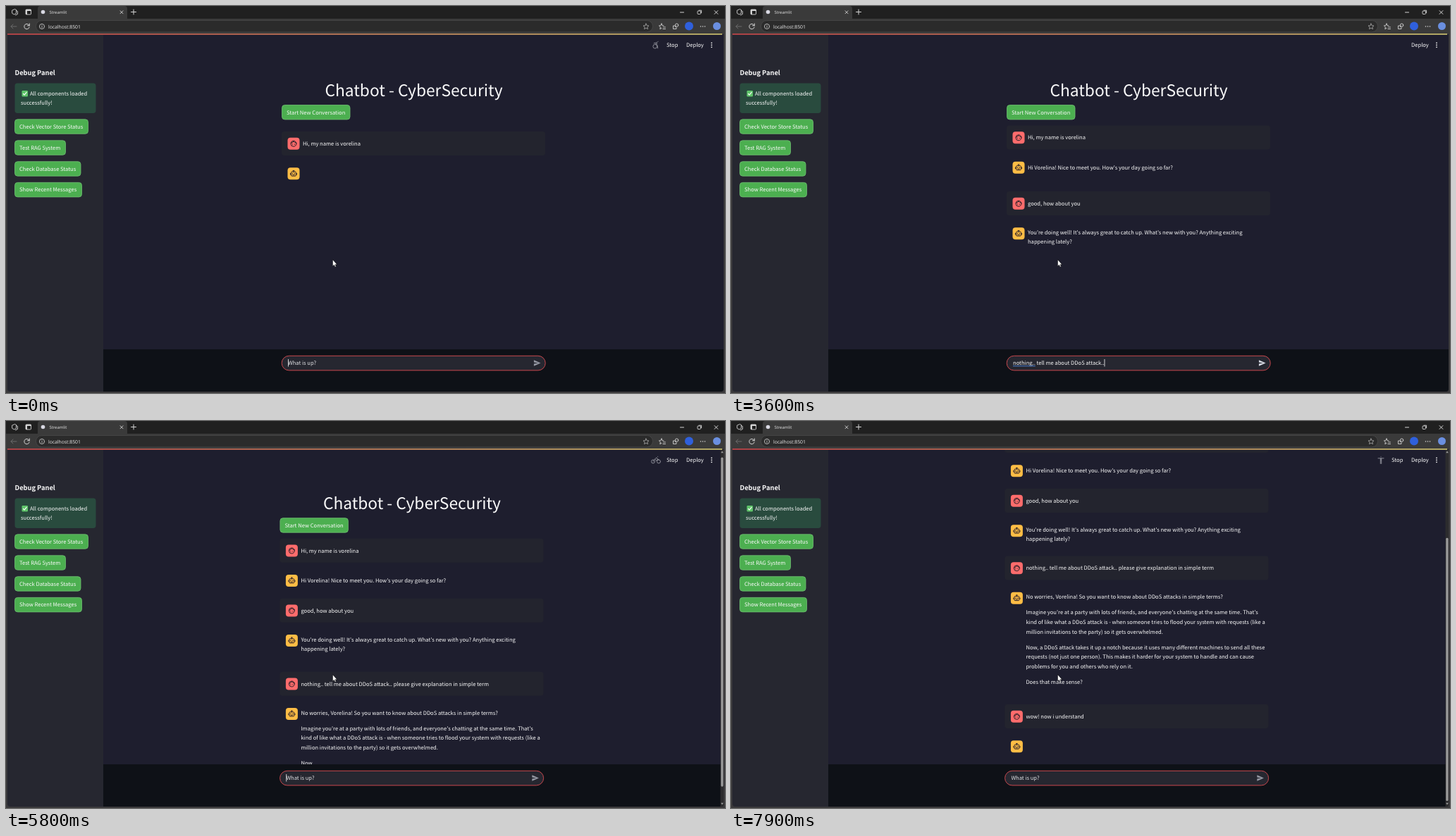
Animation, 1020 px wide and 549 px high, one loop 8000 ms. Source, as an HTML page with a canvas:

```html
<!DOCTYPE html>
<html lang="en">
<head>
<meta charset="utf-8">
<title>Chatbot demo</title>
<style>
html, body { margin: 0; width: 100%; height: 100%; overflow: hidden; background: #1e1e2e; }
canvas { display: block; width: 1020px; height: 549px; }
</style>
</head>
<body>
<canvas id="stage" width="1020" height="549"></canvas>
<script>
const ctx = document.getElementById('stage').getContext('2d');
const LOOP = 8000;
const TYPE_RATE = 0.0356, REPLY_RATE = 0.55; // characters per ms
const SCROLL_LAG = 90, TURN_GAP = 8.5;
const PAGE_FONT = '"Noto Sans CJK JP", "Noto Sans CJK SC", "Noto Sans CJK", "Noto Sans", sans-serif';
const CHROME_FONT = '"Open Sans", "Noto Sans", sans-serif';
const WHITE = '#fafafa';

// An empty line in a reply separates paragraphs.
const turns = [
  { y: 186.5, sent: 0, answer: 300, ask: 'Hi, my name is vorelina',
    reply: ["Hi Vorelina! Nice to meet you. How's your day going so far?"] },
  { y: 271.5, typed: 800, sent: 1350, answer: 1950, ask: 'good, how about you',
    reply: ["You're doing well! It's always great to catch up. What's new with you? Anything exciting",
      'happening lately?'] },
  { y: 367, typed: 2547, sent: 4900, answer: 5197,
    ask: 'nothing.. tell me about DDoS attack.. please give explanation in simple term',
    reply: ['No worries, Vorelina! So you want to know about DDoS attacks in simple terms?', '',
      "Imagine you're at a party with lots of friends, and everyone's chatting at the same time. That's",
      'kind of like what a DDoS attack is - when someone tries to flood your system with requests (like a',
      'million invitations to the party) so it gets overwhelmed.', '',
      'Now, a DDoS attack takes it up a notch because it uses many different machines to send all these',
      'requests (not just one person). This makes it harder for your system to handle and can cause',
      'problems for you and others who rely on it.', '',
      'Does that make sense?'] },
  { y: 569, typed: 6700, sent: 7400, answer: LOOP, ask: 'wow! now i understand', reply: [] }
];
for (const turn of turns) turn.done = turn.answer + turn.reply.join('').length / REPLY_RATE;

// Text is laid out large and scaled down so that glyph advances stay fractional.
function text(str, x, y, { size = 7.59, color = WHITE, weight = 400, align = 'left', font = PAGE_FONT } = {}) {
  ctx.save();
  ctx.translate(x, y + size * 0.37);
  ctx.scale(1 / 8, 1 / 8);
  ctx.font = `${weight} ${size * 8}px ${font}`;
  ctx.textRendering = 'geometricPrecision';
  ctx.textAlign = align;
  ctx.fillStyle = color;
  ctx.fillText(str, 0, 0);
  const width = ctx.measureText(str).width / 8;
  ctx.restore();
  return width;
}

function rect(x, y, w, h, color) {
  ctx.fillStyle = color;
  ctx.fillRect(x, y, w, h);
}

function box(x, y, w, h, r, fill, stroke, line = 1) {
  ctx.beginPath();
  ctx.roundRect(x, y, w, h, r);
  if (fill) { ctx.fillStyle = fill; ctx.fill(); }
  if (stroke) { ctx.strokeStyle = stroke; ctx.lineWidth = line; ctx.stroke(); }
}

function disc(x, y, r, color) {
  ctx.fillStyle = color;
  ctx.beginPath();
  ctx.arc(x, y, r, 0, 7);
  ctx.fill();
}

function strokePath(d, x, y, color, line = 1) {
  ctx.save();
  ctx.translate(x, y);
  ctx.strokeStyle = color;
  ctx.lineWidth = line;
  ctx.lineCap = ctx.lineJoin = 'round';
  ctx.stroke(new Path2D(d));
  ctx.restore();
}

function fillPath(d, x, y, color) {
  ctx.save();
  ctx.translate(x, y);
  ctx.fillStyle = color;
  ctx.fill(new Path2D(d));
  ctx.restore();
}

const ring = (x, y, r) => `M${x + r} ${y}A${r} ${r} 0 1 1 ${x - r} ${y}A${r} ${r} 0 1 1 ${x + r} ${y}`;

function button(label, x, y, w) {
  box(x + 0.5, y + 0.5, w - 1, 20.5, 4, '#4caf50', '#70bf73', 0.8);
  text(label, x + 7, y + 10.7);
}

function avatar(isUser, x, y) {
  box(x - 8.5, y - 8.5, 17, 17, 4, isUser ? '#ff6c6c' : '#ffbd45');
  const ink = '#2a2028';
  if (isUser) {
    strokePath(ring(0, 0, 4) + 'M-3.8 -.6Q-1 -.8 0 -3.6Q1 -1.2 3.8 -1.2', x, y, ink, 1);
    disc(x - 1.5, y + 0.9, 0.6, ink);
    disc(x + 1.5, y + 0.9, 0.6, ink);
  } else {
    box(x - 3.4, y - 2.5, 6.8, 6, 1, null, ink);
    strokePath('M0 -2.5V-4.2M-1 -4.2H1M-4.6 -.2V1.4M4.6 -.2V1.4M-1.3 1.9H1.3', x, y, ink, 0.9);
    disc(x - 1.4, y, 0.7, ink);
    disc(x + 1.4, y, 0.7, ink);
  }
}

const runners = [
  ring(-1.2, 1.8, 2.9) + 'M1.8 -4.6L-.4 -1.6L2 0L2.6 4.4M-2.8 -2.6L-.4 -3.4L1.8 -2.2M3 -4.9L3.2 -5',
  ring(-4, 2, 2.5) + ring(4, 2, 2.5) + 'M-4 2L-1.5 -1.5L1.5 1.5L2 -1H4M-1.5 -1.5L1 -3.6L2.4 -1.6M2.6 -5L2.8 -4.9',
  'M0 -4.8V-4.6M-4 -2.6H4M-.7 -2.4V5M.7 -2.4V5M0 -2V1',
  'M-5 1.5Q-3.5 .3 -2 1.5T1 1.5T5 1.3M-5 4.5Q-3.5 3.3 -2 4.5T1 4.5T5 4.3M-4 -3.5L-1 -4L1.5 -1L-3 0M3 -3.4L3.3 -3.3'
];

function drawBrowser() {
  const icon = '#d4d4d4', soft = '#aaa';
  rect(0, 0, 1020, 549, '#3a393b');
  rect(0, 0, 1020, 18, '#202020');
  box(45, 0, 127, 24, 4, '#3a3a3a');
  rect(0, 18, 1020, 22, '#3a3a3a');
  strokePath('M-3.5 -2.5L0 -4L2 -3V2L-1 3.5L-3.5 2ZM2 -2L4 -1V3L1 4.5', 12.5, 8.5, icon, 0.9);
  box(28, 5, 7.5, 7, 1, null, icon, 0.9);
  rect(28, 5, 7.5, 2, icon);
  rect(28, 5, 2, 7, icon);
  disc(52.5, 8.5, 2.8, '#d8d8e2');
  text('Streamlit', 61.5, 8.5, { size: 5.9, color: '#e6e6e6', font: CHROME_FONT });
  const cross = 'M-2 -2L2 2M2 -2L-2 2';
  strokePath(cross, 164, 8.8, icon, 0.9);
  strokePath('M-3.5 0H3.5M0 -3.5V3.5', 181, 8.5, icon);
  strokePath('M-2.5 0H2.5', 959, 9, icon);
  box(981, 7, 4.5, 4.5, 1, null, icon, 0.9);
  strokePath('M-1 -2.8H2.6V.8', 984, 9, icon, 0.9);
  strokePath('M-2.4 -2.4L2.4 2.4M2.4 -2.4L-2.4 2.4', 1007.5, 9, icon);

  strokePath('M4 0H-4M-1 -3L-4 0L-1 3', 11, 29, '#707070', 0.9);
  strokePath('M3.6 -1A3.7 3.7 0 1 0 3.6 1.2M3.8 -4V-1.2H1', 29.5, 29, icon);
  box(42.5, 20.5, 875, 16.5, 8.2, '#2b2b2b', '#4b4b4b', 0.8);
  strokePath(ring(0, 0, 3.6) + 'M0 -.3V1.8M0 -1.8V-1.7', 51, 29, icon, 0.8);
  text('localhost:8501', 60, 29, { size: 6.8, color: '#ededed', font: CHROME_FONT });
  const star = 'M0 -4L1.2 -1.3L4 -1L1.9 .9L2.5 3.7L0 2.3L-2.5 3.7L-1.9 .9L-4 -1L-1.2 -1.3Z';
  strokePath(star, 908, 29, soft, 0.8);
  strokePath('M-1 -4L0 -1.3L2 -1M-1 -4L-2.2 -1.3L-4.6 -1L-2.6 .9L-3.2 3.7L-1 2.5M1.5 1H4.5M1 3.5H4.5', 931, 29, icon, 0.9);
  strokePath(ring(1.6, -1.8, 2.2) + 'M-1 -1H-3.5V3.5H1V1.5M-1 1L1 -1', 950, 29, icon, 0.9);
  disc(969, 28.5, 6, '#2f60dc');
  for (const x of [985.5, 988.5, 991.5]) disc(x, 29, 0.8, icon);
  disc(1008.5, 28.5, 5.5, '#6a8fe0');
}

function drawSidebar() {
  rect(0, 40, 138, 509, '#262730');
  text('Debug Panel', 12.5, 94.5, { size: 9.3, weight: 700 });
  box(12.5, 109.5, 115, 42.5, 4, '#294b3e');
  box(22.5, 120, 8.5, 8.5, 1.2, '#5fc46a');
  strokePath('M-2.2 .2L-.6 1.8L2.4 -2', 26.7, 124.3, '#fff', 1.1);
  text('All components loaded', 34, 124.5);
  text('successfully!', 21, 137.3);
  button('Check Vector Store Status', 12, 160.3, 105);
  button('Test RAG System', 12, 190.3, 73);
  button('Check Database Status', 12, 220.2, 94.5);
  button('Show Recent Messages', 12, 249.9, 96);
}

// Lines of the reply written so far, with their vertical offsets.
function writtenLines(turn, t) {
  let left = Math.floor((t - turn.answer) * REPLY_RATE), dy = turn.reply.length > 1 ? -1.5 : 0;
  const lines = [];
  for (const line of turn.reply) {
    if (left <= 0) break;
    if (!line) { dy += 8.5; continue; }
    lines.push({ str: line.slice(0, left), dy });
    left -= line.length;
    dy += 13.6;
  }
  return lines;
}

const currentIndex = t => turns.findLastIndex(turn => t >= turn.sent);

function overflowAt(t) {
  const turn = turns[Math.max(0, currentIndex(t))];
  const lines = writtenLines(turn, t);
  const tail = lines.length ? lines[lines.length - 1].dy : 1.5;
  return Math.max(0, turn.y + 42.5 + TURN_GAP + tail - 463);
}

function drawChat(t, current, scroll) {
  ctx.save();
  ctx.beginPath();
  ctx.rect(138, 40, 876, 447);
  ctx.clip();
  ctx.translate(0, -scroll);
  text('Chatbot - CyberSecurity', 578.5, 119.3, { size: 22.75, align: 'center' });
  button('Start New Conversation', 391, 140, 97.5);
  turns.slice(0, current + 1).forEach((turn, i) => {
    const y = turn.y + (i === current ? TURN_GAP : 0);
    box(391, y - 17, 374, 34, 4, '#23242e');
    avatar(true, 408, y + 0.3);
    text(turn.ask, 421, y);
    avatar(false, 408, y + 42.7);
    for (const { str, dy } of writtenLines(turn, t)) text(str, 421, y + 42.5 + dy);
  });
  ctx.restore();
}

function drawInput(t, current) {
  const next = turns[current + 1];
  const typed = next && t >= next.typed ? next.ask.slice(0, Math.floor((t - next.typed) * TYPE_RATE)) : '';
  box(391.2, 496.3, 374, 20.6, 10.3, '#262730', '#c9484e', 1);
  const width = text(typed || 'What is up?', 400, 506.2, { color: typed ? WHITE : '#e2e3e6' });
  for (const word of ['nothing..', 'attack..']) {
    const at = typed.indexOf(word);
    if (at < 0 || typed.length < at + word.length + 8) continue;
    ctx.font = `60.72px ${PAGE_FONT}`;
    const start = ctx.measureText(typed.slice(0, at)).width / 8;
    rect(400 + start, 510.3, ctx.measureText(word).width / 8, 0.9, '#4f86e0');
  }
  if (typed || (t - turns[current].sent) % 300 < 150) rect(400 + (typed ? width : 0), 501, 0.8, 10.5, WHITE);
  fillPath('M-4.6 -4.2L5 0L-4.6 4.2V1L1.5 0L-4.6 -1Z', 753.5, 506.5, typed ? '#d6d9e2' : '#9497a2');
}

function drawScrollbar(overflow, scroll) {
  const total = 507 + overflow;
  rect(1013.5, 41, 5, 506, '#2c2c2e');
  box(1014.3, 49 + 490 * scroll / total, 3.2, 490 * 507 / total, 1.6, '#9c9c9c');
  fillPath('M-1.8 1.2L0 -1.5L1.8 1.2Z', 1016, 44, '#9c9c9c');
  fillPath('M-1.8 -1.2L0 1.5L1.8 -1.2Z', 1016, 543, '#9c9c9c');
}

function drawHeader(t, running) {
  const bar = ctx.createLinearGradient(2, 0, 1016, 0);
  bar.addColorStop(0, '#e0484c');
  bar.addColorStop(1, '#e8dc78');
  rect(2, 39.3, 1014, 1.4, bar);
  if (running) {
    strokePath(runners[Math.floor(t / 230) % runners.length], 922, 55.5, '#898a94', 1);
    text('Stop', 937, 55.2);
  }
  text('Deploy', 965, 55.2);
  for (const y of [52.3, 55.3, 58.3]) disc(1001, y, 0.9, WHITE);
}

function draw(t) {
  const current = currentIndex(t), overflow = overflowAt(t);
  const scroll = Math.min(overflow, overflowAt(t - SCROLL_LAG));
  drawBrowser();
  ctx.save();
  ctx.beginPath();
  ctx.roundRect(2, 39, 1016, 508, [0, 0, 4, 4]);
  ctx.clip();
  rect(138, 40, 880, 507, '#1e1e2e');
  drawSidebar();
  rect(138, 487, 880, 60, '#0e1117');
  ctx.save();
  if (overflow) ctx.translate(-2.6, 0);
  drawInput(t, current);
  ctx.restore();
  ctx.save();
  ctx.beginPath();
  ctx.rect(138, 40, 880, 447);
  ctx.clip();
  if (overflow) ctx.translate(-2.6, 0);
  drawChat(t, current, scroll);
  ctx.restore();
  if (overflow) drawScrollbar(overflow, scroll);
  drawHeader(t, t < turns[current].done);
  ctx.restore();
  fillPath('M0 0V9L2 7.2L3.4 10.2L4.8 9.6L3.5 6.7H6Z', 463.5, 360, '#fff');
  strokePath('M0 0V9L2 7.2L3.4 10.2L4.8 9.6L3.5 6.7H6Z', 463.5, 360, '#111', 0.5);
}

const start = performance.now();
function tick() {
  draw((performance.now() - start) % LOOP);
  requestAnimationFrame(tick);
}
tick();
</script>
</body>
</html>
```
